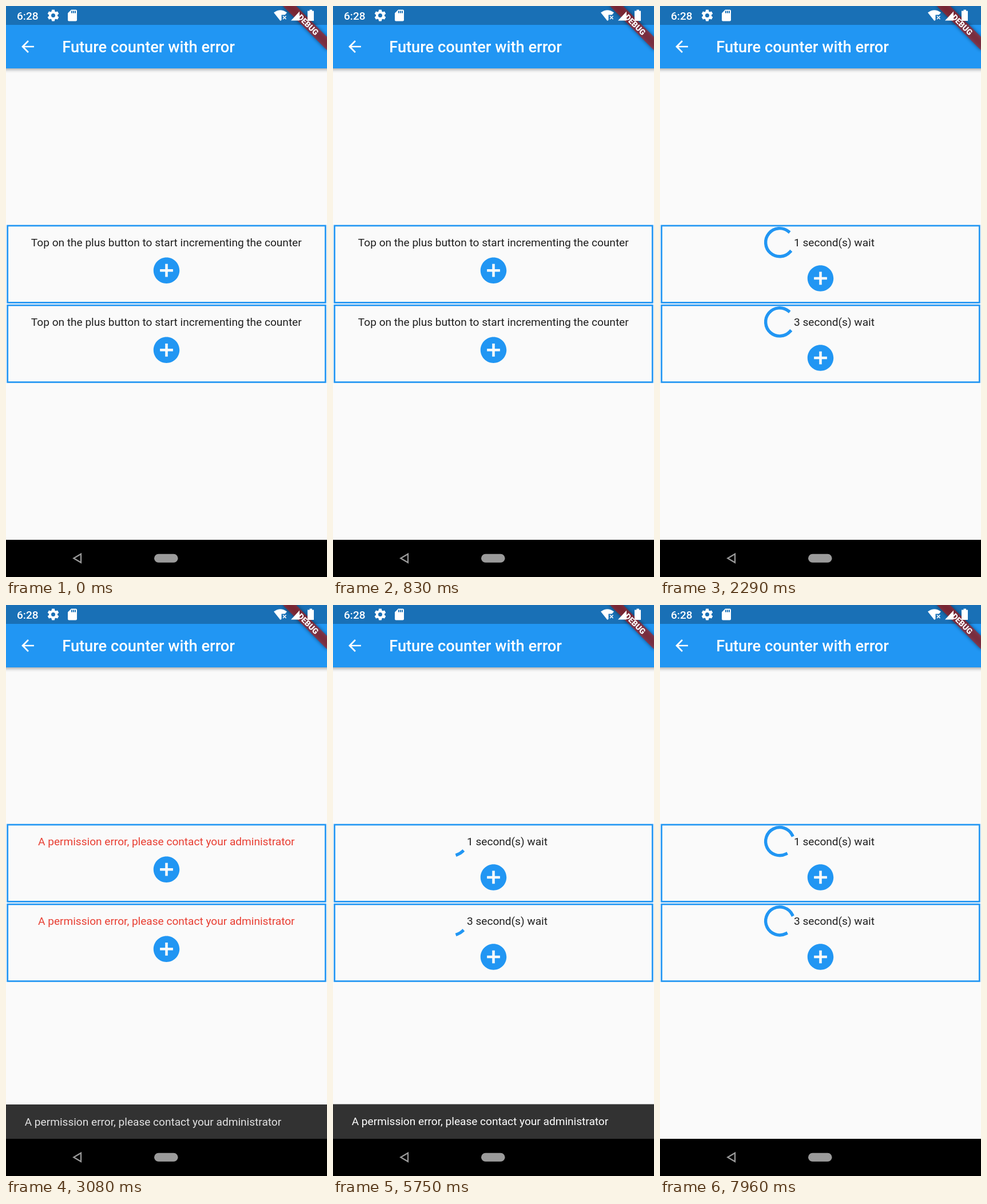
Animation, 561 px wide and 998 px high, one loop 8 s. Source, as an HTML page:

```html
<!DOCTYPE html>
<html lang="en">
<head>
<meta charset="utf-8">
<title>Future counter with error</title>
<style>
  html, body { margin: 0; width: 100%; height: 100%; overflow: hidden; background: #fafafa; }
  svg { display: block; width: 100%; height: 100%; }
  text { font: 400 19.09px Roboto, sans-serif; white-space: pre; }
  .mid { text-anchor: middle; }
  .title { font-size: 27.27px; font-weight: 500; }
  .clock { font-size: 19.09px; font-weight: 500; }
  .debug { font-size: 13.9px; font-weight: 900; }
</style>
</head>
<body>
<svg viewBox="0 0 561 998" xmlns="http://www.w3.org/2000/svg">
  <defs>
    <filter id="soft" x="-20%" y="-60%" width="140%" height="220%"><feGaussianBlur stdDeviation="3"/></filter>
    <clipPath id="page"><rect width="561" height="933"/></clipPath>
    <path id="plus" transform="scale(2.273) translate(-12 -12)" fill="#2196f3" d="M12 2C6.48 2 2 6.48 2 12s4.48 10 10 10 10-4.48 10-10S17.52 2 12 2zm5 11h-4v4h-2v-4H7v-2h4V7h2v4h4v2z"/>
  </defs>

  <rect width="561" height="998" fill="#fafafa"/>
  <rect x="-10" y="60" width="581" height="51" fill="#000" opacity=".36" filter="url(#soft)"/>
  <rect width="561" height="109" fill="#2196f3"/>
  <rect width="561" height="33" fill="#1970b6"/>

  <path transform="translate(38 71) scale(1.364) translate(-12 -12)" fill="#fff" d="M20 11H7.83l5.59-5.59L12 4l-8 8 8 8 1.41-1.41L7.83 13H20v-2z"/>
  <text class="title" x="98.2" y="81" fill="#fff">Future counter with error</text>

  <g id="cards"></g>

  <g clip-path="url(#page)">
    <g id="snack">
      <rect y="872.5" width="561" height="61" fill="#323232"/>
      <text id="snackText" x="32.7" y="909.3" fill="#fff"></text>
    </g>
  </g>

  <g transform="translate(561 0) rotate(45)">
    <rect x="-54.5" y="38.2" width="109" height="16.4" opacity=".5" filter="url(#soft)"/>
    <rect x="-54.5" y="38.2" width="109" height="16.4" fill="#b71c1c" fill-opacity=".63"/>
    <text class="debug mid" y="51.3" fill="#fff">DEBUG</text>
  </g>

  <g fill="#fff">
    <text class="clock" x="19" y="24">6:28</text>
    <path transform="translate(82.5 16.5) translate(-12 -12)" fill-rule="evenodd" d="M19.43 12.98c.04-.32.07-.64.07-.98s-.03-.66-.07-.98l2.11-1.65c.19-.15.24-.42.12-.64l-2-3.46c-.12-.22-.39-.3-.61-.22l-2.49 1c-.52-.4-1.08-.73-1.69-.98l-.38-2.65C14.46 2.18 14.25 2 14 2h-4c-.25 0-.46.18-.49.42l-.38 2.65c-.61.25-1.17.59-1.69.98l-2.49-1c-.23-.09-.49 0-.61.22l-2 3.46c-.13.22-.07.49.12.64l2.11 1.65c-.04.32-.07.65-.07.98s.03.66.07.98l-2.11 1.65c-.19.15-.24.42-.12.64l2 3.46c.12.22.39.3.61.22l2.49-1c.52.4 1.08.73 1.69.98l.38 2.65c.03.24.24.42.49.42h4c.25 0 .46-.18.49-.42l.38-2.65c.61-.25 1.17-.59 1.69-.98l2.49 1c.23.09.49 0 .61-.22l2-3.46c.12-.22.07-.49-.12-.64zM12 15.5a3.5 3.5 0 1 1 0-7 3.5 3.5 0 0 1 0 7z"/>
    <path transform="translate(116 16.5) translate(-12 -12)" d="M18 2h-8L4.02 8 4 20c0 1.1.9 2 2 2h12c1.1 0 2-.9 2-2V4c0-1.1-.9-2-2-2zm-6 6h-2V4h2v4zm3 0h-2V4h2v4zm3 0h-2V4h2v4z"/>
    <path d="M468 11.5Q479.500 3 491 11.500L487.500 15.500H481.500V24.500L479.500 26Z"/>
    <path d="M484 17.500L489.500 23M489.500 17.500L484 23" stroke="#fff" stroke-width="1.700"/>
    <path d="M498 25.500L513 9.500V25.500Z"/>
    <path d="M530.500 6.500h4.500v2h3v17.500h-11v-17.500h3.500z"/>
  </g>

  <rect y="933" width="561" height="65"/>
  <path d="M131 957.700V972.700L118.300 965.200Z" fill="none" stroke="#9b9b9b" stroke-width="2.200"/>
  <rect x="259" y="957.700" width="41.500" height="15" rx="7.500" fill="#9b9b9b"/>
</svg>

<script>
const LOOP = 8000, BLUE = '#2196f3', INK = '#1f1f1f', RED = '#e83e32';
const IDLE = 'Top on the plus button to start incrementing the counter';
const ERROR = 'A permission error, please contact your administrator';
// Each press starts a one-second wait when the finger lifts.
const WAIT = 1000, HOLD = 210, LIFTS = [1860, 4930, 7460];
const SNACK_IN = 2860, SNACK_OUT = 7110, SLIDE = 250, SNACK_H = 61;

const clamp = v => Math.min(1, Math.max(0, v));

// cubic-bezier(.4, 0, .2, 1), solved by bisection
function ease(x) {
  if (x <= 0 || x >= 1) return clamp(x);
  let lo = 0, hi = 1;
  for (let i = 0; i < 24; i++) {
    const s = (lo + hi) / 2, r = 1 - s;
    if (1.2 * r * r * s + 0.6 * r * s * s + s * s * s < x) lo = s; else hi = s;
  }
  return 3 * lo * lo - 2 * lo ** 3;
}

function add(parent, tag, attrs) {
  const el = document.createElementNS('http://www.w3.org/2000/svg', tag);
  set(el, attrs);
  return parent.appendChild(el);
}
function set(el, attrs) {
  for (const k in attrs) el.setAttribute(k, attrs[k]);
}

function makeCard(top, seconds) {
  const g = add(document.getElementById('cards'), 'g', { transform: `translate(0 ${top})` });
  add(g, 'rect', { x: 2.7, y: 1.4, width: 555.6, height: 134.4, fill: 'none', stroke: BLUE, 'stroke-width': 2.7 });
  const label = add(g, 'text', { class: 'mid', x: 280.3, y: 37.2 });
  const wait = add(g, 'g', {});
  const arc = add(wait, 'path', { fill: 'none', stroke: BLUE, 'stroke-width': 5.45, 'stroke-linecap': 'square' });
  add(wait, 'text', { x: 234, y: 37.2, fill: INK }).textContent = `${seconds} second(s) wait`;
  const button = add(g, 'g', {});
  const glow = add(button, 'circle', { r: 47.7, fill: '#bcbcbc' });
  const splash = add(button, 'circle', { fill: '#c8c8c8' });
  add(button, 'use', { href: '#plus' });
  return { label, wait, arc, button, glow, splash };
}

const cards = [makeCard(382.6, 1), makeCard(521.7, 3)];
const snack = document.getElementById('snack');
const snackText = document.getElementById('snackText');
snackText.textContent = ERROR;

function arcPath(ms) {
  const turn = Math.floor(ms / 1000) % 5, p = ms / 1000 % 1;
  const head = ease(p * 2), tail = ease(p * 2 - 1);
  const a = Math.PI * (-0.5 + 1.5 * tail + 1.7 * p - 0.8 * turn);
  const sweep = Math.max(1.5 * Math.PI * (head - tail), 0.001);
  const at = q => `${(209.2 + 24.55 * Math.cos(q)).toFixed(3)} ${(30.6 + 24.55 * Math.sin(q)).toFixed(3)}`;
  return `M${at(a)}A24.55 24.55 0 ${sweep > Math.PI ? 1 : 0} 1 ${at(a + sweep)}`;
}

function drawCard(card, t, pressed) {
  const lift = LIFTS.find(s => t >= s && t < s + WAIT);
  const waiting = lift !== undefined;
  card.wait.style.display = waiting ? '' : 'none';
  card.label.style.display = waiting ? 'none' : '';
  if (waiting) {
    set(card.arc, { d: arcPath(t - lift) });
  } else {
    const done = LIFTS.filter(s => t >= s + WAIT).length;
    card.label.textContent = [IDLE, ERROR, '1'][done];
    set(card.label, { fill: done === 1 ? RED : INK });
  }
  set(card.button, { transform: `translate(280.5 ${waiting ? 93.3 : 79.6})` });

  const hit = pressed ? LIFTS.find(s => t >= s - HOLD && t < s + 200) : undefined;
  const on = hit !== undefined, after = on ? Math.max(0, t - hit) : 0;
  const held = on ? Math.min(HOLD, t - hit + HOLD) : 0;
  const fade = on ? 1 - after / 200 : 0;
  set(card.glow, { opacity: 0.4 * clamp(held / 200) * fade });
  set(card.splash, { r: Math.min(47.7, 47.7 * held / 1000 + after * 1.364), opacity: 0.4 * fade });
}

function draw(t) {
  cards.forEach((card, i) => drawCard(card, t, i === 0));
  const leaving = t >= SNACK_OUT;
  const open = leaving ? 1 - (t - SNACK_OUT) / SLIDE : (t - SNACK_IN) / SLIDE;
  snack.style.display = open > 0 ? '' : 'none';
  set(snack, { transform: `translate(0 ${SNACK_H * (1 - ease(open))})` });
  set(snackText, { opacity: leaving ? 1 : ease((open - 0.72) / 0.28) });
}

const start = performance.now();
function tick() {
  draw((performance.now() - start) % LOOP);
  requestAnimationFrame(tick);
}
tick();
</script>
</body>
</html>
```
